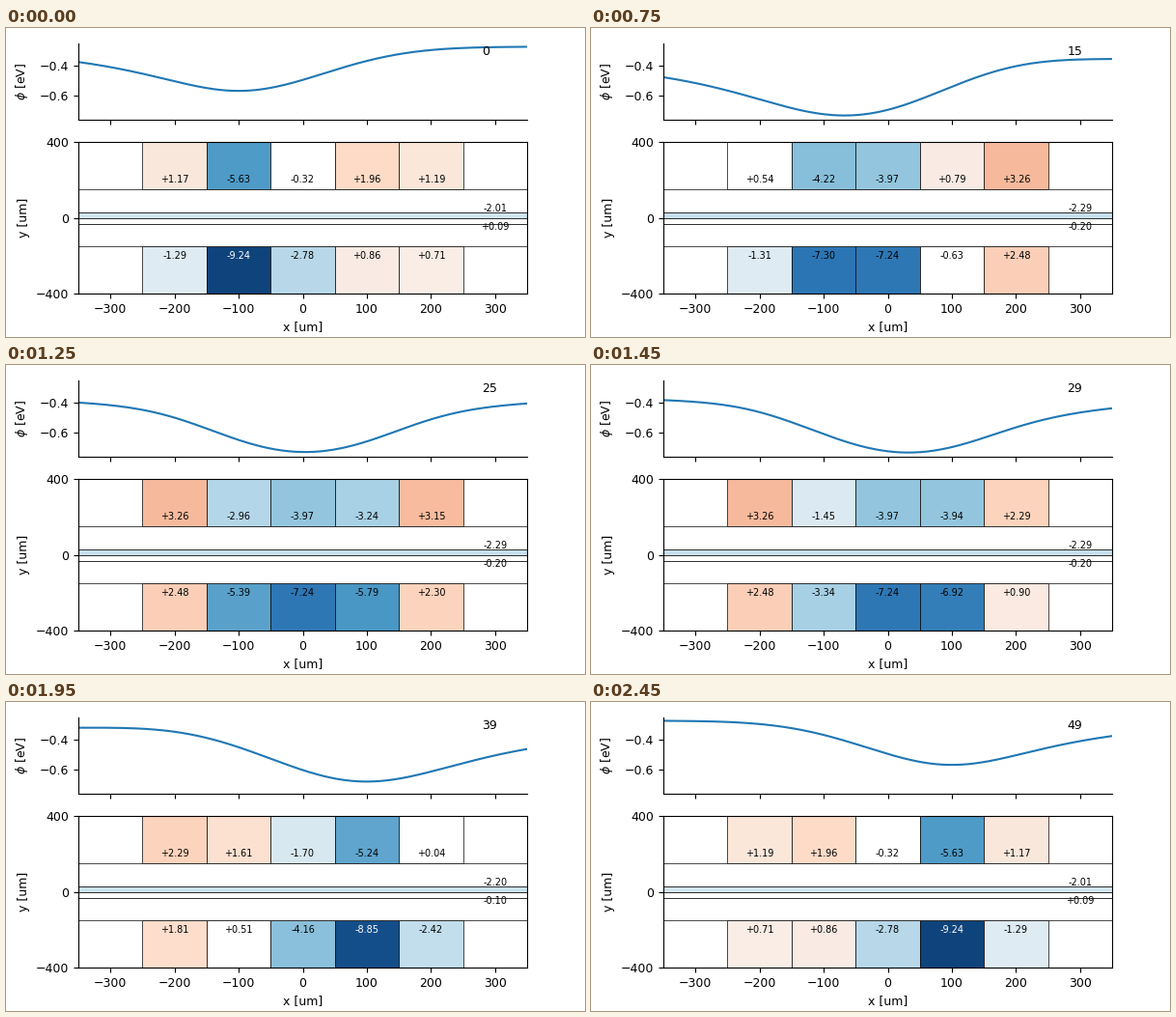
A matplotlib script for the animation above (2.5 s loop, 600 px wide and 320 px high).

```python
import numpy as np
import matplotlib.pyplot as plt
from matplotlib.animation import FuncAnimation
from matplotlib.patches import Rectangle

FRAMES, INTERVAL = 50, 50
INNER, OUTER = 30, 150              # rail edges in um
HEIGHT = np.sqrt(INNER * OUTER)     # ion height above the plane
STRIP_GAIN = np.arctan(INNER / HEIGHT) / np.pi
CENTERS = np.arange(-200, 201, 100)

MID = (FRAMES - 1) / 2
DEPART, CRUISE = 10, 15             # well starts moving, reaches full depth

# Well resting at x = -100: top row voltages and their change per step.
REST = np.array([1.17, -5.63, -0.32, 1.96, 1.19])
DEEPEN = np.array([-0.113, 0.039, -0.138, -0.035, 0.11])

# Steps from the middle of the trip, and a row's key voltages on the way.
STOPS = [-9.5, -4.5, 0, 4.5, 9.5]
TOP = dict(outer=[0.54, 2.29, 3.26],
           inner=[-4.22, -3.94, -3.15, -1.45, 0.79], centre=-3.97)
BOTTOM = dict(outer=[-1.31, 0.90, 2.48],
              inner=[-7.30, -6.92, -5.65, -3.34, -0.63], centre=-7.24)

plt.rcParams.update({"font.family": "DejaVu Sans", "font.size": 9})


def resting(i):
    """Both rows deepen alike; the bottom one keeps a tilt around the well."""
    top = REST + i * DEEPEN
    tilt = 3.61 / (1 + ((CENTERS + 100) / 199)**2)**1.7
    return np.concatenate([top, top - tilt])


def cruising(u):
    def row(outer, inner, centre):
        o1, o2 = np.interp([u, -u], STOPS[:3], outer)
        i1, i2 = np.interp([u, -u], STOPS, inner)
        return [o1, i1, centre, i2, o2]
    return np.array(row(**TOP) + row(**BOTTOM))


def electrodes(i):
    if i <= DEPART:
        return resting(i)
    if i >= CRUISE:
        return cruising(i - MID)
    t = (i - DEPART) / (CRUISE - DEPART)
    return (1 - t) * resting(DEPART) + t * cruising(CRUISE - MID)


def voltages(i):
    """Five top and five bottom electrodes, mirrored on the second half."""
    k = min(i, FRAMES - 1 - i)
    rows = electrodes(k).reshape(2, 5)
    if k < i:
        rows = rows[:, ::-1]
    strips = np.array([-2.006, 0.088]) - 0.286 * min(k / CRUISE, 1)
    return rows, strips


def edge_angle(d):
    root = np.sqrt(d**2 + OUTER**2 + HEIGHT**2)
    return np.arctan(d / HEIGHT) - np.arctan(d * OUTER / (HEIGHT * root))


x = np.linspace(-350, 350, 281)
shapes = np.array([edge_angle(x - c + 50) - edge_angle(x - c - 50)
                   for c in CENTERS]) / (2 * np.pi)


def potential(rows, strips):
    return rows.sum(axis=0) @ shapes + STRIP_GAIN * strips.sum()


def fill(v):
    if -0.65 < v < 0.6:
        return "white"
    return plt.cm.RdBu_r((v + 10) / 20)


fig, (ax_phi, ax) = plt.subplots(
    2, 1, sharex=True, figsize=(6, 3.2), dpi=100,
    gridspec_kw=dict(height_ratios=[1, 2], left=0.125, right=0.9,
                     bottom=0.14, top=0.95, hspace=0.2))

ax_phi.set(ylim=(-0.755, -0.257), yticks=[-0.6, -0.4], ylabel=r"$\phi$ [eV]")
ax_phi.spines[["top", "right"]].set_visible(False)
curve, = ax_phi.plot(x, potential(*voltages(0)), color="C0", lw=1.5)
counter = ax_phi.text(280, -0.33, "0")

ax.set(xlim=(-350, 350), ylim=(-400, 400), yticks=[-400, 0, 400],
       xticks=range(-300, 301, 100), xlabel="x [um]", ylabel="y [um]")
fig.align_ylabels()


def add_rect(x0, y0, w, h):
    return ax.add_patch(Rectangle((x0, y0), w, h, facecolor="white",
                                  edgecolor="black", lw=0.5))


def add_label(cx, cy):
    return ax.text(cx, cy, "", ha="center", va="center", fontsize=7)


pads = [add_rect(c - 50, y0, 100, 850)
        for y0 in (OUTER, -1000) for c in CENTERS]
pads += [add_rect(-1000, y0, 2000, INNER) for y0 in (0, -INNER)]
for y0 in (INNER, -OUTER):
    add_rect(-1000, y0, 2000, OUTER - INNER)
labels = [add_label(c, cy) for cy in (200, -200) for c in CENTERS]
labels += [add_label(300, cy) for cy in (50, -50)]


def update(i):
    rows, strips = voltages(i)
    curve.set_ydata(potential(rows, strips))
    counter.set_text(str(i))
    for pad, label, v in zip(pads, labels, [*rows.flat, *strips]):
        pad.set_facecolor(fill(v))
        label.set_text(f"{v:+.2f}")
        label.set_color("white" if v < -8 else "black")
    return [curve, counter, *pads, *labels]


anim = FuncAnimation(fig, update, frames=FRAMES, interval=INTERVAL,
                     repeat=True, repeat_delay=0, blit=False)
plt.show()
```
